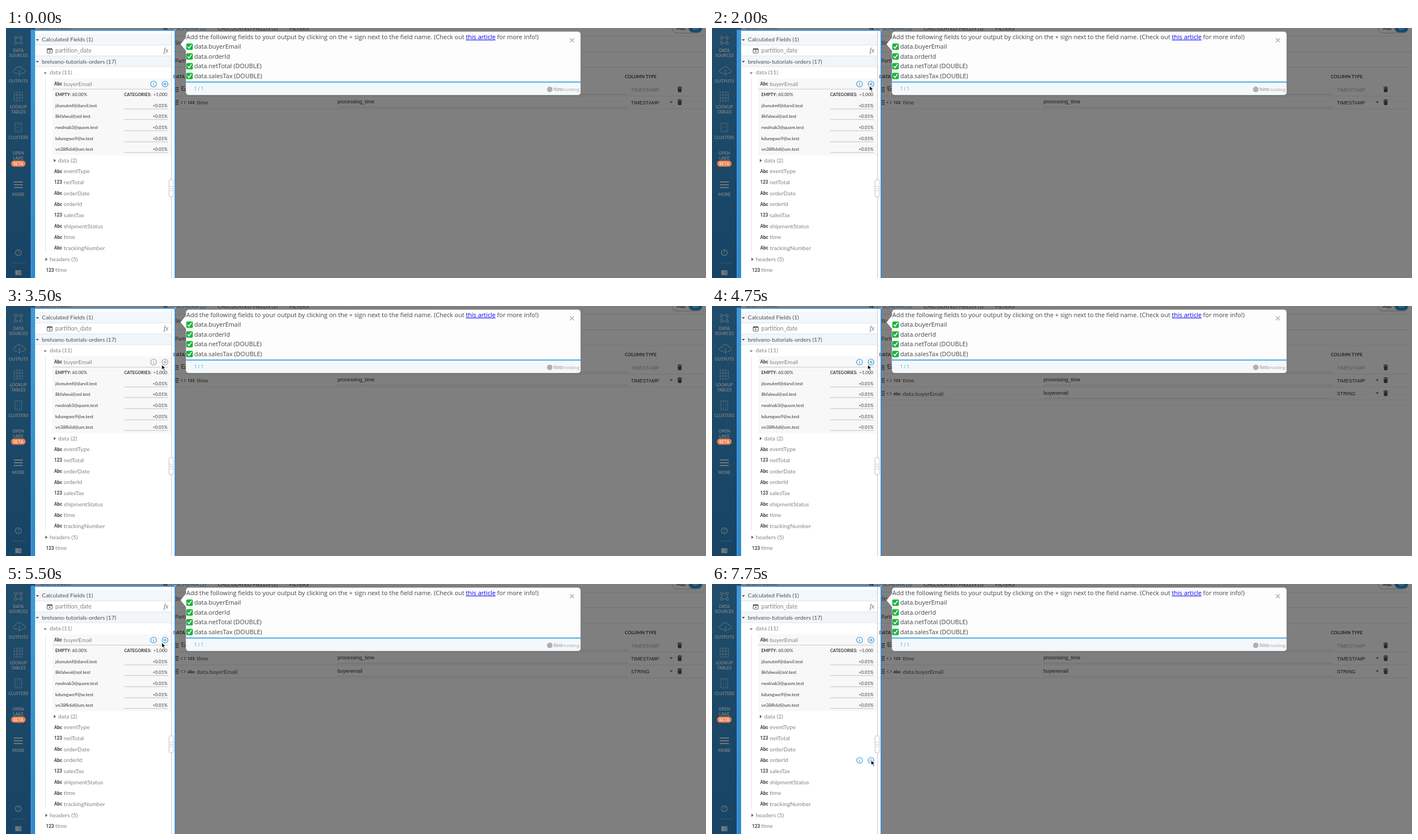
Write an HTML page with a canvas that moves like this. It is 1250 px wide and 448 px high and loops after 8000 ms.

```html
<!DOCTYPE html>
<html lang="en">
<head>
<meta charset="utf-8">
<title>Adding fields to an output</title>
<style>
html, body { margin: 0; width: 100%; height: 100%; overflow: hidden; background: #fff; }
canvas { display: block; }
</style>
</head>
<body>
<canvas id="stage" width="1250" height="448"></canvas>
<script>
const ctx = document.getElementById('stage').getContext('2d');
const LOOP = 8000;
const LATO = 'Lato, sans-serif', OPEN = '"Open Sans", sans-serif';
const ARIAL = '"Liberation Sans", sans-serif', ROBOTO = 'Roboto, sans-serif';
const BLUE = '#2f97dc', DARK = '#333', GREY = '#858585';
const ROW = 19.65;

// Each stop holds until the next one: time, x, y of the pointer tip.
const pointerStops = [
  [500, 555.5, 5], [750, 292.5, 184], [1000, 288.5, 183.5], [1250, 256.5, 156.5],
  [1500, 272.5, 109], [1750, 278, 103.5], [2000, 281, 103], [2750, 277, 105],
  [3000, 278, 104.5], [6250, 282, 169.5], [6500, 282.5, 230], [7000, 282.5, 268.5],
  [7250, 282.5, 305], [7500, 282.5, 313.5], [7750, 284, 315]
];
// Hovered row centre by time.
const hoverStops = [[6500, 237], [7000, 257], [7250, 296], [7500, 316]];
const lastStop = (stops, t) => stops.filter(s => s[0] <= t).pop();

// Text is centred vertically on y.
function text(str, x, y, size, color = GREY, font = LATO, weight = 400, align = 'left') {
  ctx.font = `${weight} ${size}px ${font}`;
  ctx.textAlign = align;
  ctx.fillStyle = color;
  ctx.fillText(str, x, y + size * 0.36);
  return ctx.measureText(str).width;
}
function rect(x, y, w, h, color) {
  ctx.fillStyle = color;
  ctx.fillRect(x, y, w, h);
}
function round(x, y, w, h, r, fill, stroke, width = 1) {
  ctx.beginPath();
  ctx.roundRect(x, y, w, h, r);
  if (fill) { ctx.fillStyle = fill; ctx.fill(); }
  if (stroke) { ctx.strokeStyle = stroke; ctx.lineWidth = width; ctx.stroke(); }
}
function path(d, x, y, stroke, width = 1, fill) {
  const p = new Path2D(d);
  ctx.save();
  ctx.translate(x, y);
  if (fill) { ctx.fillStyle = fill; ctx.fill(p); }
  if (stroke) { ctx.strokeStyle = stroke; ctx.lineWidth = width; ctx.stroke(p); }
  ctx.restore();
}
function circle(x, y, r, fill, stroke, width = 1) {
  ctx.beginPath();
  ctx.arc(x, y, r, 0, Math.PI * 2);
  if (fill) { ctx.fillStyle = fill; ctx.fill(); }
  if (stroke) { ctx.strokeStyle = stroke; ctx.lineWidth = width; ctx.stroke(); }
}
const caret = (x, y, open, color = '#555') =>
  path(open ? 'M-2.7 -1.5H2.7L0 1.8Z' : 'M-1.5 -3L2 0L-1.5 3Z', x, y, null, 0, color);
function calendar(x, y, s, color) {
  round(x - s, y - s + 1, s * 2, s * 2 - 1, 1, null, color);
  rect(x - s, y - s + 1, s * 2, 2, color);
  rect(x - 1, y, 2.5, 2, color);
}
const typeTag = (tag, x, y, size = 8.2) => text(tag, x, y, size, '#444', ROBOTO, 700);

function sidebar() {
  const shade = ctx.createLinearGradient(0, 0, 0, 448);
  shade.addColorStop(0, '#3f9ad6');
  shade.addColorStop(1, '#2f8acb');
  rect(0, 0, 52, 448, shade);
  const white = '#e6f2fb';
  const label = (str, y) => text(str, 22, y, 7.4, '#fff', LATO, 700, 'center');
  label('DATA', 40); label('SOURCES', 49);
  label('OUTPUTS', 95);
  label('LOOKUP', 141); label('TABLES', 150);
  label('CLUSTERS', 196);
  label('OPEN', 224); label('LAKE', 233);
  label('MORE', 298);

  path('M-7 -7H-3V-3H-7ZM3 -7H7V-3H3ZM-7 3H-3V7H-7ZM3 3H7V7H3ZM-3 -5H3M-5 -3V3M5 -3V3M-3 5H3', 22, 22, white, 0.8);
  path('M-4 4H-6C-12 4 -12 -3 -7 -3C-6 -9 4 -9 5 -4C12 -4 12 4 6 4H4M0 -2V7M-3 4.5L0 7.5L3 4.5', 24, 77, white, 1);
  path('M-7.5 -8H7.5V8H-7.5ZM-7.5 -3H7.5M-7.5 2.5H7.5M-2.5 -8V8M2.5 -8V8', 22, 123, white, 0.6);
  path('M-6 -8H6V8H-6ZM-3 -5H-1M1 -5H3M-3 0H-1M1 0H3M-3 5H-1M1 5H3', 22, 178, white, 0.7);
  for (const y of [275, 280, 285]) rect(14, y, 16, 1.7, '#fff');
  circle(22, 402.5, 5.3, null, white, 1.1);
  text('?', 22, 402.5, 8, white, LATO, 700, 'center');
  rect(12, 420.5, 23, 1, 'rgba(255,255,255,.35)');
  path('M-5 -4H-.5V4H-5ZM.5 -4H5V4H.5Z', 22, 438.5, white, 0.9, white);
  path('M1.5 -2H4M1.5 0H4M1.5 2H4', 22, 438.5, '#3b8cc8', 0.7);
}
function betaBadge() {
  round(9, 237.5, 26, 11, 5.5, '#ea7f4f');
  text('BETA', 22, 243, 7.4, '#fff', LATO, 400, 'center');
}

function rowButtons(y, color) {
  circle(263.5, y, 5.2, null, color, 1.1);
  path('M0 -.8V2.7M0 -2.8V-1.8', 263.5, y, color, 1.1);
  circle(284, y, 5.2, null, color, 1.1);
  path('M-3 0H3M0 -3V3', 284, y, color, 1.1);
}

function fieldPanel(t) {
  rect(52, 0, 243, 448, '#fff');
  text('Search Fields', 59, 0, 10, '#999');
  circle(284, -1, 3, null, '#444', 1.2);
  path('M0 0L4 4', 286, 1, '#444', 1.5);
  rect(52, 10.5, 243, 20, '#f2f7fb');
  rect(52, 30, 243, 1, '#dde3e8');
  rect(52, 50, 243, 19.5, '#f0f6fa');
  rect(52, 49.5, 243, 1, '#dde3e8');
  rect(52, 69, 243, 1, '#e4e9ed');

  caret(56, 21.5, true);
  text('Calculated Fields (1)', 64, 20.5, 10.4, '#505050');
  calendar(78, 40.5, 4.5, '#555');
  text('partition_date', 88, 40, 10.5);
  text('fx', 281.5, 39.5, 11.5, '#666', '"Liberation Serif", serif', 'italic 400');
  caret(56, 60.5, true);
  text('brelvano-tutorials-orders (17)', 64, 60, 10.3, '#505050');
  rect(70, 90, 1, 313, '#e2e2e2');
  caret(70, 81, true, '#777');
  text('data (11)', 78, 79.5, 10.4);

  // Statistics of the expanded field
  rect(83, 90, 212, 138, '#f8f8f8');
  rect(83, 109, 206, 1, '#c9c9c9');
  typeTag('Abc', 86, 100);
  text('buyerEmail', 103, 100, 10.4);
  rowButtons(100.5, t >= 3500 && t < 4750 ? '#999' : BLUE);
  text('EMPTY:', 88, 119.5, 7.7, DARK, LATO, 700);
  text('60.00%', 118, 119.5, 8, DARK);
  text('CATEGORIES:', 211, 119.5, 7.7, DARK, LATO, 700);
  text('>1,000', 288, 119.5, 8, DARK, LATO, 400, 'right');
  ['j6onutmf@darvil.test', '8kfalwui@zol.test', 'rwolnab3@quom.test', 'kdumgwo9@w.test', 'vn38fk6d@um.test']
    .forEach((mail, i) => {
      const y = 138.7 + i * ROW;
      text(mail, 88, y, 8.1, DARK);
      text('<0.01%', 288.5, y, 8, DARK, LATO, 400, 'right');
      rect(211, Math.round(y + 5), 78, 2, '#dcdcdc');
    });

  caret(87, 237.5, false);
  text('data (2)', 93, 237, 10.4);
  const fields = ['eventType', 'netTotal', 'orderDate', 'orderId', 'salesTax', 'shipmentStatus', 'time', 'trackingNumber'];
  fields.forEach((name, i) => {
    const y = 256.7 + i * ROW;
    typeTag(/netTotal|salesTax/.test(name) ? '123' : 'Abc', 86, y);
    text(name, 103, y, 10.4);
  });
  caret(72, 414.5, false);
  text('headers (5)', 78, 414, 10.4);
  typeTag('123', 71.5, 433.7);
  text('time', 88, 433.7, 10.4);

  const hover = lastStop(hoverStops, t);
  if (hover) rowButtons(hover[1], BLUE);
  rect(295, 0, 1, 448, '#c8c8c8');
}

function panelHandle() {
  round(291, 271.5, 8, 31.5, 4, '#fff', '#bdbdbd');
  for (let i = 0; i < 6; i++) rect(293 + i % 2 * 3, 283 + (i >> 1) * 4, 1.2, 1.2, '#999');
}

function trash(y) {
  path('M-4 -3.5H4M-1.5 -4.5H1.5', 1203, y, '#555', 1.4);
  path('M-3.5 -2H3.5L3 5H-3Z', 1203, y, null, 0, '#555');
}
function tableRow(y, name, output, type, tag) {
  for (let i = 0; i < 6; i++) rect(303 + i % 2 * 3, y - 4 + (i >> 1) * 3.3, 2, 2, '#555');
  if (tag) {
    path('M-1.5 -2.5L-4 0L-1.5 2.5M1.5 -2.5L4 0L1.5 2.5', 316.5, y + 0.5, '#444', 1);
    typeTag(tag, 324, y + 0.5, 7.5);
    caret(1188, y, true, '#666');
  } else {
    path('M-4 -4H0M-4 -1.5H0M-2 -1.5V3H1M1 0H5M1 3H5M0 -4H3', 316.5, y - 1, '#444', 1.2);
    calendar(332, y + 0.5, 2.5, '#666');
  }
  text(name, 340.5, y + 0.5, 10.4, '#555');
  text(output, 592, y - 0.8, 9.05, '#333', ARIAL);
  rect(592, y + 8.5, 518, 1, '#dadada');
  text(type, 1116, y + 0.8, 8.75, tag ? '#333' : '#aaa', ARIAL);
  trash(y);
  rect(296, y + 11.5, 954, 1, '#e8e8e8');
}

function table(t) {
  const added = t >= 4750;
  rect(296, 0, 954, 448, '#fff');
  text(`SCHEMA (${added ? 3 : 2})`, 304, 0.5, 9.6, BLUE);
  text('CALCULATED FIELDS (1)', 378, 0.5, 9.6, '#555');
  text('FILTERS', 506, 0.5, 9.6, '#555');
  round(1189, -9, 54, 18, 9, '#fff', '#bbb');
  round(1219, -8, 24, 16, 8, BLUE);
  text('SQL', 1197, -0.5, 9, '#444', LATO, 700);
  text('UI', 1231, -0.5, 9, '#fff', LATO, 700, 'center');
  for (const y of [14, 42, 70]) rect(296, y, 954, 1, '#e8e8e8');

  text('Status:', 302, 27, 9.5, '#444');
  text('Non Aggregated Output', 335, 27, 9.5, '#444');
  text('|', 440, 27, 9.5, '#aaa');
  text('Non Updating Output', 446, 27, 9.5, '#444');
  text('Partitioned by event time (Daily partitions)', 302, 58.5, 9.35, '#444');
  path('M-4 4L-3 1L2 -4L4 -2L-1 3Z', 486, 58.5, null, 0, BLUE);
  text('Manage Partitions', 492, 58.5, 9.5, BLUE);
  text('DATA SOURCE FIELD', 298.5, 87, 8, '#444', LATO, 700);
  path('M-4.5 -4H4.5L1.3 0V4L-1.3 2.5V0Z', 384, 87, BLUE, 1.1);
  text('OUTPUT COLUMN NAME', 589, 87, 8, '#444', LATO, 700);
  text('COLUMN TYPE', 1105, 87, 8, '#444', LATO, 700);

  tableRow(110, 'partition_date', 'partition_date', 'TIMESTAMP');
  tableRow(133, 'time', 'processing_time', 'TIMESTAMP', '123');
  if (added) tableRow(156.3, 'data.buyerEmail', 'buyeremail', 'STRING', 'Abc');
}

function spotlight() {
  ctx.beginPath();
  ctx.rect(0, 0, 1250, 448);
  ctx.rect(44, 3, 259, 460);
  ctx.fillStyle = 'rgba(0,0,0,.5)';
  ctx.fill('evenodd');
  round(45, 4, 257, 460, 2, null, '#3f8fd9', 2);
}

function guide() {
  const ink = '#444';
  path('M0 0L11 -13V13Z', 311.5, 29, null, 0, '#fff');
  round(321.5, 6.5, 704.5, 113.5, 5, '#fdfdfd');
  round(321.5, 97, 704.5, 23, [0, 0, 5, 5], '#f4f8fb');
  rect(321.5, 95.8, 704.5, 2, '#46ace6');

  let x = 322;
  x += text('Add the following fields to your output by clicking on the + sign next to the field name. (Check out ', x, 16, 11, ink, OPEN);
  const link = text('this article', x, 16, 11, '#0000ee', OPEN);
  rect(x, 21, link, 1, '#0000ee');
  text(' for more info!)', x + link, 16, 11, ink, OPEN);
  ['buyerEmail', 'orderId', 'netTotal (DOUBLE)', 'salesTax (DOUBLE)'].forEach((name, i) => {
    const y = 33.2 + i * 17.5;
    round(322, y - 5.5, 11.6, 11.6, 2, '#18b53c');
    path('M-3.5 .3L-1 3L3.5 -3.2', 327.8, y, '#fff', 1.7);
    text('data.' + name, 336, y, 11, ink, OPEN);
  });
  path('M-3.5 -3.5L3.5 3.5M3.5 -3.5L-3.5 3.5', 1010.5, 22, '#aaa', 1.4);
  text('1 / 1', 336, 109, 8.2, '#46a5e0', OPEN);
  circle(971, 110, 5, '#b0b0b0');
  const bold = text('hint', 978, 110, 8, '#999', OPEN, 600);
  text('molding', 978 + bold, 110, 8, '#a5a5a5', OPEN);
}

function pointer(t) {
  const stop = lastStop(pointerStops, t);
  if (stop) path('M0 0V10.2L2.4 8L4.2 12.2L6.1 11.4L4.3 7.3H7.6Z', stop[1], stop[2], '#fff', 1.2, '#000');
}

function draw(t) {
  const shifted = t >= 5250 && t < 5500;
  table(t);
  sidebar();
  fieldPanel(t);
  if (!shifted) spotlight();
  betaBadge();
  panelHandle();
  ctx.save();
  if (shifted) ctx.translate(-302, -93);
  guide();
  ctx.restore();
  pointer(t);
}

function tick() {
  draw(performance.now() % LOOP);
  requestAnimationFrame(tick);
}
tick();
</script>
</body>
</html>
```
